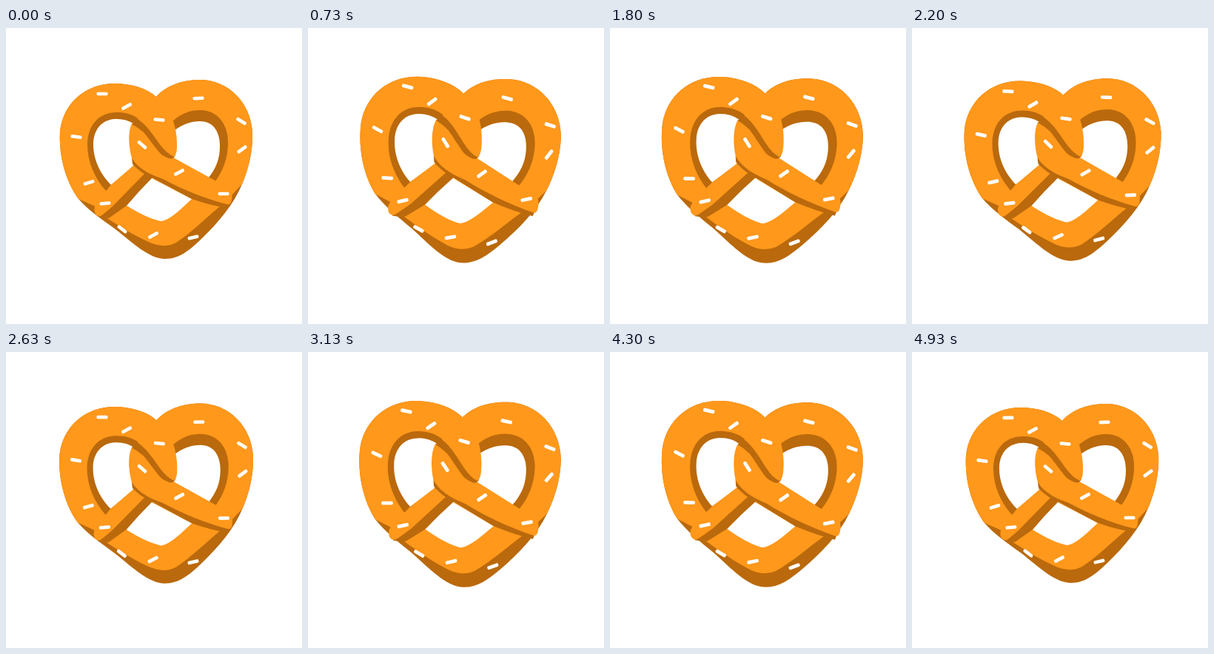
An HTML page for the animation above (5010 ms loop, 400 px wide and 400 px high).

```html
<!DOCTYPE html>
<html lang="en">
<head>
<meta charset="utf-8">
<title>Pretzel</title>
<style>
  html, body { margin: 0; height: 100%; overflow: hidden; background: #fff; }
  svg { display: block; width: 100%; height: 100%; }
  .dough { fill: #ff981b; }
  .side { fill: #ba690c; }
  .gap, #salt { fill: #fff; }
</style>
</head>
<body>
<svg viewBox="0 0 400 400">
  <g id="pretzel">
    <!-- silhouette with its thickness, then the front face -->
    <path class="side" d="M203 93C190 81 168 75 147 75C107 75 77 102 73 140C71 175 82 209 98 231C111 246 130 259 148 272C172 291 194 312 215 312C234 312 247 301 263 286C287 263 308 238 319 211C328 190 334 165 333 140C330 99 299 70 262 70C235 70 214 80 203 93Z"/>
    <path class="dough" d="M203 93C190 81 168 75 147 75C107 75 77 102 73 140C71 175 82 209 98 231L123 242L138 258C158 271 178 283 197 291Q215 298 230 290C250 277 270 257 288 242L305 226L319 211C328 190 334 165 333 140C330 99 299 70 262 70C235 70 214 80 203 93Z"/>

    <!-- upper openings -->
    <path class="side" d="M150 114C124 114 110 133 110 158C110 181 120 203 135 220L172 188L227 175C214 170 204 153 196 141C184 124 172 114 150 114Z"/>
    <path class="gap" d="M147 123C129 124 118 138 118 157C118 180 129 199 142 212L172 187L180 160L172 129Q161 122 147 123Z"/>
    <path class="side" d="M225 126C237 115 250 111 262 111C286 111 300 130 300 155C300 176 293 193 283 207L225 176Z"/>
    <path class="gap" d="M228 138C239 130 250 126 262 126C281 126 289 141 289 160C289 178 283 190 274 202L222 176Z"/>

    <!-- lower opening -->
    <path class="gap" d="M163 240L195 202L251 231L236 245Q218 261 209 261Q190 257 163 240Z"/>

    <path class="side" id="leftSide"/>
    <path class="dough" id="leftArm"/>
    <path class="side" id="rightSide"/>
    <path class="dough" id="rightArm"/>

    <!-- strand crossing over the middle -->
    <path class="side" d="M170 130C176 124 184 126 190 132L229 172Q226 178 220 176C206 170 195 151 186 141Q178 134 170 130Z"/>
    <path class="dough" d="M203 93C222 103 232 136 231 160Q231 170 227 174C213 168 205 152 196 141Q188 130 178 123L180 100Z"/>
    <g id="salt"></g>
  </g>
</svg>
<script>
const $ = id => document.getElementById(id);
const LOOP = 5010, CX = 206, CY = 194;

// x, y, angle at each end of the swing
const grains = [
  [130, 89, 0, 16], [163, 106, -28, -47], [207, 124, 5, 20],
  [260, 95, -2, 19], [318, 126, 31, 5], [319, 164, -36, -66],
  [95, 147, 8, 34], [184, 158, 40, 63], [234, 195, -28, -46],
  [294, 224, 0, -24], [112, 209, -17, 8], [134, 237, -5, -24],
  [157, 272, 38, 19], [199, 280, -28, -6], [253, 283, -13, -31]
].map(([x, y, from, to]) => {
  const el = document.createElementNS("http://www.w3.org/2000/svg", "rect");
  for (const [key, value] of Object.entries({ x: -7.5, y: -2.3, width: 15, height: 4.6, rx: 1.8 }))
    el.setAttribute(key, value);
  $("salt").append(el);
  return { el, x, y, from, to };
});

const wave = turns => (1 - Math.cos(2 * Math.PI * turns)) / 2;

// The arm tips slide outward as the pretzel swings.
function drawArms(swing) {
  const tip = (dx, dy) => (x, y) => `${x + dx * swing} ${y + dy * swing}`;
  const l = tip(-6, 3.5), r = tip(7, 3.5);
  $("leftSide").setAttribute("d",
    `M187 194L198 202Q180 220 163 240L139 257Q${l(132, 256)} ${l(126, 255)}L${l(124, 247)}Z`);
  $("leftArm").setAttribute("d",
    `M172 186L141 213L${l(123, 236)}Q${l(118, 242)} ${l(120, 249)}Q${l(122, 255)} ${l(128, 254)}Q${l(133, 251)} 145 240L188 196Z`);
  $("rightSide").setAttribute("d",
    `M170 176L171 184Q182 196 197 202L251 231Q280 241 ${r(299, 243)}L${r(302, 234)}L200 180Z`);
  $("rightArm").setAttribute("d",
    `M170 129C164 142 166 161 170 176C180 192 198 199 212 204C240 219 270 231 ${r(298, 238)}Q${r(304, 240)} ${r(305, 232)}Q${r(307, 221)} ${r(300, 214)}L284 207L226 175Q217 177 209 170C199 159 190 143 183 136Q177 130 170 129Z`);
}

function render(now) {
  // twenty steps a second, alternating 30 ms and 70 ms
  const t = now % LOOP;
  const step = Math.min(99, 2 * Math.floor(t / 100) + (t % 100 >= 30 ? 1 : 0));
  const swing = wave(step / 50), pulse = wave(step / 25);
  $("pretzel").setAttribute("transform",
    `translate(${CX} ${CY}) rotate(${6.1 * swing}) scale(${1 + 0.046 * pulse}) translate(${-CX} ${-CY})`);
  drawArms(swing);
  for (const { el, x, y, from, to } of grains)
    el.setAttribute("transform", `translate(${x} ${y}) rotate(${from + (to - from) * swing})`);
  requestAnimationFrame(render);
}
render(0);
</script>
</body>
</html>
```
